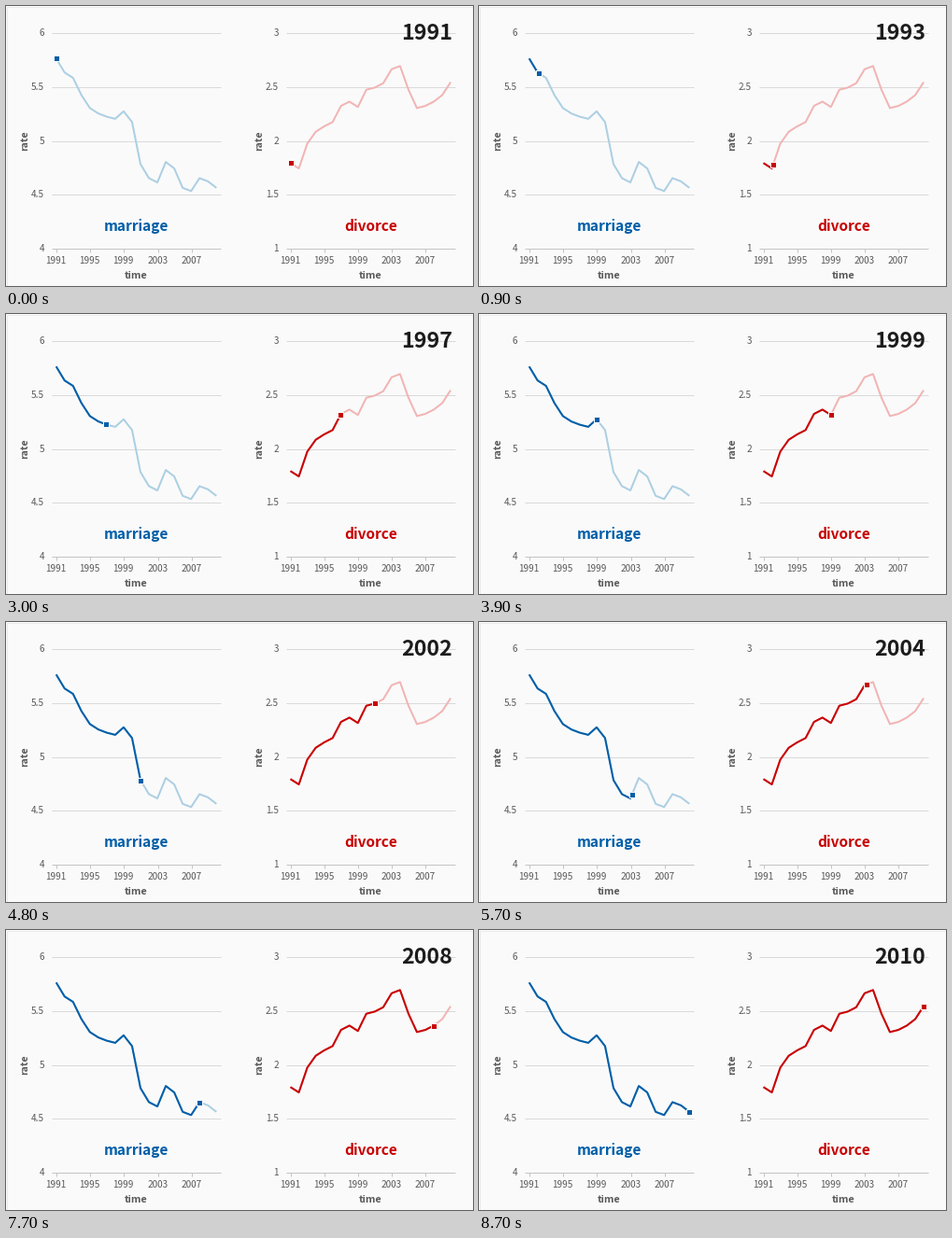
A matplotlib script for the animation above (10 s loop, 500 by 300 pixels).

```python
import math
import numpy as np
import matplotlib.pyplot as plt
from matplotlib.animation import FuncAnimation

W, H, DPI = 500, 300, 100
PX = 72 / DPI
FRAME_MS, FRAMES = 100, 100
FIRST, LAST = 1991, 2010
BG, GRID, AXIS, GREY = "#fafafa", "#d9d9d9", "#c4c4c4", "#595959"
FONT = "Noto Sans CJK JP"
TOP, BOTTOM, STEP = 28.5, 259.5, 9.03

MARRIAGE = [5.76, 5.63, 5.58, 5.42, 5.30, 5.25, 5.22, 5.20, 5.27, 5.17,
            4.78, 4.65, 4.61, 4.80, 4.74, 4.56, 4.53, 4.65, 4.62, 4.56]
DIVORCE = [1.79, 1.74, 1.97, 2.08, 2.13, 2.17, 2.32, 2.36, 2.31, 2.47,
           2.49, 2.53, 2.66, 2.69, 2.47, 2.30, 2.32, 2.36, 2.42, 2.54]

# The reveal pauses on the first year, then runs at an almost even pace.
PACE_MS = [400, 1700, 3000, 4800, 6500, 7700, 8600]
PACE_YEARS = [0, 2.98, 5.94, 10.05, 14.09, 16.96, 19]

fig = plt.figure(figsize=(W / DPI, H / DPI), dpi=DPI, facecolor=BG)
ax = fig.add_axes([0, 0, 1, 1])
ax.set_xlim(0, W)
ax.set_ylim(H, 0)
ax.axis("off")


def label(x, y, text, size, color=GREY, weight="normal", **kw):
    style = dict(ha="center", va="baseline") | kw
    return ax.text(x, y, text, fontsize=size * PX, color=color,
                   family=FONT, weight=weight, **style)


def rule(xs, ys, color):
    ax.plot(xs, ys, color=color, lw=PX, solid_capstyle="butt")


class Panel:
    def __init__(self, x0, low, high, values, title, color, pale):
        self.x = x0 + STEP * np.arange(len(values))
        self.y = BOTTOM - (np.array(values) - low) / (high - low) * (BOTTOM - TOP)
        left, right = x0 - 4.5, x0 + 176
        middle = (left + right) / 2
        for i, value in enumerate(np.linspace(low, high, 5)):
            y = math.floor(BOTTOM - i * (BOTTOM - TOP) / 4) + 0.5
            rule([left, right], [y, y], GRID if i else AXIS)
            label(x0 - 12.5, y + 3.7, f"{value:g}", 10, ha="right")
        for year in range(FIRST, LAST, 4):
            x = math.floor(x0 + STEP * (year - FIRST)) + 0.5
            rule([x, x], [BOTTOM, BOTTOM + 4], AXIS)
            label(x, 275.7, str(year), 10)
        label(middle, 292, "time", 10.8, weight="bold")
        label(x0 - 33.5, 144.5, "rate", 10.5, weight="bold", rotation=90,
              va="center")
        label(middle, 241, title, 15.4, color, "bold")

        line = dict(lw=2 * PX, solid_joinstyle="round", solid_capstyle="butt")
        ax.plot(self.x, self.y, color=pale, **line)
        self.trail, = ax.plot([], [], color=color, **line)
        self.marker, = ax.plot([], [], "s", ms=6 * PX, mfc=color, mec=BG,
                               mew=PX, zorder=4)

    def reveal(self, years):
        whole = int(years)
        index = np.arange(len(self.x))
        x = np.interp(years, index, self.x)
        y = np.interp(years, index, self.y)
        self.trail.set_data(np.append(self.x[:whole + 1], x),
                            np.append(self.y[:whole + 1], y))
        self.marker.set_data([x], [y])
        return self.trail, self.marker


panels = [
    Panel(53.7, 4, 6, MARRIAGE, "marriage", "#005ea8", "#accfe3"),
    Panel(304.5, 1, 3, DIVORCE, "divorce", "#c80000", "#f2b4b4"),
]
year_text = label(450.3, 35.5, "", 23.3, "#1c1c1c", "bold", zorder=5)
rule([0.5, 0.5, W - 0.5, W - 0.5, 0.5], [0.5, H - 0.5, H - 0.5, 0.5, 0.5], "#ececec")


def draw(frame):
    years = np.interp(frame * FRAME_MS, PACE_MS, PACE_YEARS)
    year_text.set_text(str(FIRST + math.ceil(years)))
    return [year_text] + [part for panel in panels for part in panel.reveal(years)]


anim = FuncAnimation(fig, draw, frames=FRAMES, interval=FRAME_MS,
                     repeat=True, repeat_delay=0, blit=False)
plt.show()
```
